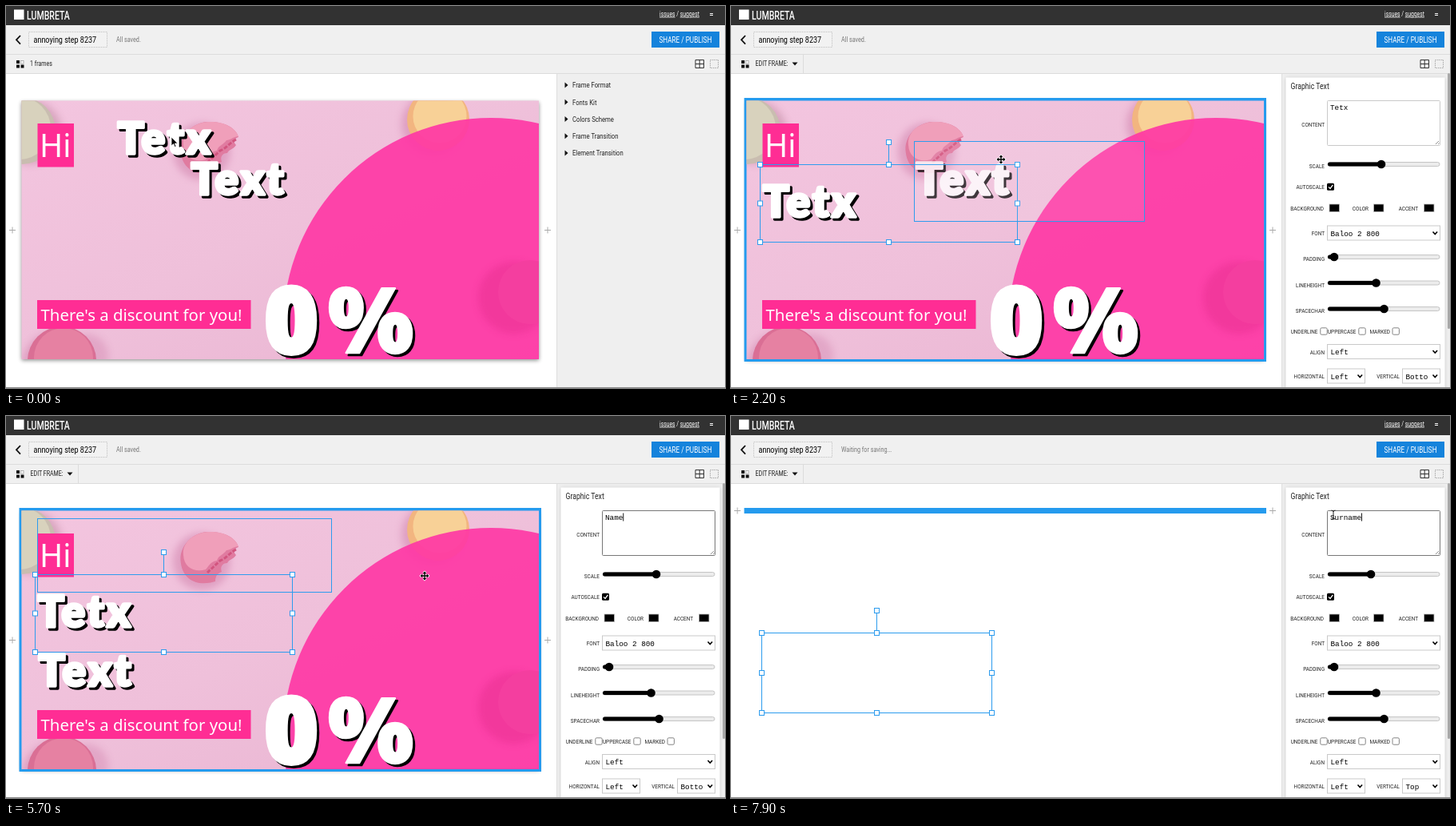
Write an HTML page that moves like this. It is 900 px wide and 478 px high and loops after 8 s.

```html
<!DOCTYPE html>
<html lang="en">
<head>
<meta charset="utf-8">
<title>Slide editor</title>
<style>
html, body { margin: 0; width: 100%; height: 100%; overflow: hidden; background: #fff; }
svg { display: block; width: 100vw; height: 100vh; }
text { white-space: pre; }
.ui { font-family: Roboto, "Liberation Sans", sans-serif; }
.mono { font: 9.3px "Liberation Mono", monospace; fill: #000; }
.sans { font-family: "Noto Sans", "Open Sans", sans-serif; font-weight: 500; fill: #fff; }
.chubby { font-family: Lato, "Open Sans", sans-serif; font-weight: 900; letter-spacing: 3px; stroke-linejoin: round; }
.figure { font-family: "Open Sans", "Noto Sans", sans-serif; font-weight: 800; stroke-linejoin: round; }
.line { fill: none; stroke: #2d9cee; stroke-width: 1; }
.handle { fill: #fff; stroke: #2d9cee; stroke-width: 1; }
.field { fill: #fff; stroke: #c9c9c9; stroke-width: 1; }
</style>
</head>
<body>
<svg id="stage" viewBox="0 0 900 478" preserveAspectRatio="none">
  <defs>
    <clipPath id="slideClip"><rect x="19.5" y="118.5" width="647.5" height="323.5"/></clipPath>
    <linearGradient id="paper" x1="0" y1="0" x2="1" y2="1">
      <stop offset="0" stop-color="#f3c5df"/><stop offset=".5" stop-color="#efc0da"/><stop offset="1" stop-color="#e9b3d1"/>
    </linearGradient>
    <filter id="soft" x="-30%" y="-30%" width="160%" height="160%"><feGaussianBlur stdDeviation="5"/></filter>
    <filter id="lift" x="-5%" y="-5%" width="110%" height="112%"><feGaussianBlur stdDeviation="2.5"/></filter>
  </defs>
  <rect width="900" height="478" fill="#fff"/>
  <g id="chrome"></g>
  <g id="canvas"></g>
  <g id="side"></g>
  <g id="overlay"></g>
  <g id="pointer"></g>
</svg>
<script>
const LOOP = 8000, STEP = 100;
const $ = id => document.getElementById(id);
const put = (id, markup) => $(id).insertAdjacentHTML('beforeend', markup);
const rect = (x, y, w, h, fill, more = '') =>
  `<rect x="${x}" y="${y}" width="${w}" height="${h}" fill="${fill}" ${more}/>`;
const ball = (x, y, r, fill, more = '') => `<circle cx="${x}" cy="${y}" r="${r}" fill="${fill}" ${more}/>`;
const path = (d, more) => `<path d="${d}" ${more}/>`;

// Interface lettering in a condensed cut
const label = (x, y, size, str, more = '', narrow = .82) =>
  `<text class="ui" transform="translate(${x} ${y}) scale(${narrow} 1)" font-size="${size}" fill="#222" ${more}>${str}</text>`;
const tag = (x, y, str) => label(x, y, 7.8, str, 'text-anchor="end"');
const mono = (x, y, str, id = '') => `<text class="mono" x="${x}" y="${y}" id="${id}">${str}</text>`;

// Header and toolbars
put('chrome',
  rect(0, 0, 900, 24, '#323232') +
  rect(10, 4.5, 12.5, 12.5, '#fff') +
  label(26, 16.5, 15.5, 'LUMBRETA', 'style="fill:#fff" font-weight="500"', .68) +
  label(818, 12.5, 8.3, '<tspan text-decoration="underline">issues</tspan> / <tspan text-decoration="underline">suggest</tspan>', 'style="fill:#fff"') +
  rect(881, 9, 4, 1, '#fff') + rect(881, 11, 4, 1, '#fff') +
  rect(0, 24, 900, 61, '#f0f0f0') +
  path('M0 60.5H900M0 84.5H900', 'stroke="#dcdcdc"') +
  path('M18 37L13 42.3L18 47.6', 'fill="none" stroke="#111" stroke-width="1.8"') +
  rect(28.5, 32.5, 98, 19, '#f2f2f2', 'stroke="#ccc" stroke-dasharray="2 1"') +
  label(34.5, 46, 11, 'annoying step 8237', 'style="fill:#000"') +
  label(138, 45, 8.8, 'All saved.', 'id="status" style="fill:#777"') +
  rect(808, 32, 85, 20, '#1583dc') +
  label(850.5, 46, 10, 'SHARE / PUBLISH', 'text-anchor="middle" style="fill:#fff"') +
  rect(13, 68, 4, 4, '#111') + rect(18.5, 68.5, 3.5, 3.5, '#fff', 'stroke="#999" stroke-width=".7"') +
  rect(13, 73.5, 4, 4, '#111') + rect(18.5, 73.5, 4, 4, '#111') +
  `<g id="barIdle">${label(30, 75, 8.6, '1 frames')}</g>` +
  `<g id="barEdit">${label(30.5, 75, 8.6, 'EDIT FRAME:')}${path('M76.5 70.5H83.5L80 74.5Z', 'fill="#111"')}
    ${path('M90.5 61V84', 'stroke="#dcdcdc"')}</g>` +
  path('M863 67.5H873.5V77.5H863ZM868.2 67.5V77.5M863 72.5H873.5', 'fill="none" stroke="#333"') +
  rect(881.5, 67.5, 10, 10, 'none', 'stroke="#aaa" stroke-dasharray="1.5 1"'));

// Slide
const sticker = (id, x, y, size, str, edge, face = 'chubby') => `<g id="${id}" class="${face}" font-size="${size}" stroke-width="${edge}">
  <text x="${x + 3}" y="${y + 3}" fill="#000" stroke="#000">${str}</text>
  <text x="${x}" y="${y}" fill="#fff" stroke="#fff">${str}</text></g>`;
const cookie = (x, y, r, base, top) =>
  ball(x - 7, y + 6, r, '#c8719f', 'opacity=".42" filter="url(#soft)"') +
  ball(x, y, r, base) + ball(x + 2, y - 4, r * .86, top, 'opacity=".8"');

put('canvas',
  rect(19.5, 120.5, 647.5, 323, '#000', 'id="shade" opacity=".45" filter="url(#lift)"') +
  rect(16.5, 115, 653.5, 330, '#259bee', 'id="border"') +
  `<g id="slide" clip-path="url(#slideClip)">` +
  rect(19, 118, 649, 325, 'url(#paper)') +
  ball(30, 158, 40, '#b77f96', 'opacity=".45" filter="url(#soft)"') +
  ball(20, 156, 42, '#c9bdb0') + ball(17, 153, 39, '#d8d2bd') +
  ball(245, 182, 36, '#c8719f', 'opacity=".42" filter="url(#soft)"') +
  path('M219 185C215 165 232 146 252 145C272 144 288 152 291 164C285 166 284 170 288 174C284 180 279 179 277 184C270 184 268 190 270 195C263 197 262 203 262 207C240 214 222 205 219 185Z', 'fill="#e07ba0"') +
  path('M222 174C220 158 236 146 253 145C272 144 287 152 291 163C283 164 281 168 276 168C272 174 266 174 264 181C256 182 254 188 250 192C236 196 223 190 222 174Z', 'fill="#f09fba"') +
  path('M288 167C279 172 276 178 268 181C262 187 258 190 252 196', 'fill="none" stroke="#d2557f" stroke-width="3" stroke-dasharray="5 2"') +
  cookie(541, 142, 39, '#f2b580', '#fbd99d') +
  ball(100, 438, 28, '#c8719f', 'opacity=".3" filter="url(#soft)"') +
  cookie(70, 444, 43, '#da6f95', '#ea86a6') +
  ball(607, 400, 260, '#ff36a5', 'opacity=".9"') +
  `<g opacity=".55">${ball(636, 365, 45, '#d9217f', 'opacity=".55" filter="url(#soft)"')}${ball(656, 358, 40, '#ee3c98')}</g>` +
  rect(39.5, 147, 45.5, 54.5, '#ff2d94') +
  '<text class="sans" x="42" y="188.5" font-size="39.5">Hi</text>' +
  rect(39, 368, 267.5, 36, '#ff2d94') +
  '<text class="sans" x="43.5" y="393.5" font-size="20.4">There\'s a discount for you!</text>' +
  sticker('tetx', 139.5, 185, 55, 'Tetx', 3.4) +
  sticker('text', 231.5, 236, 55, 'Text', 3.4) +
  sticker('zero', 324, 434, 113, '0', 6, 'figure') +
  sticker('percent', 403, 434, 113, '%', 2.5, 'figure') +
  '</g>' +
  '<g id="pluses" stroke="#aaa">' +
  path('M4 0H12M8 -4V4M674 0H682M678 -4V4', 'fill="none"') + '</g>');

// Side bar
const menu = ['Frame Format', 'Fonts Kit', 'Colors Scheme', 'Frame Transition', 'Element Transition']
  .map((str, i) => {
    const y = 99 + i * 21.25;
    return path(`M699.5 ${y - 3.5}L703.5 ${y}L699.5 ${y + 3.5}Z`, 'fill="#111"') + label(709, y + 3.3, 9.4, str);
  }).join('');
const slider = (name, y, x, id = '') => tag(743, y + 5, name) +
  rect(747, y - 2.5, 140, 5, '#ececec', 'rx="2.5" stroke="#b9b9b9" stroke-width=".8"') +
  `<g id="${id}">` + rect(747, y - 2.5, x - 747, 5, '#000', 'rx="2.5"') + ball(x, y, 5.3, '#000') + '</g>';
const select = (x, y, w, str, id) => rect(x, y, w, 18, '#fff', 'class="field"') + mono(x + 4, y + 12.5, str, id) +
  rect(x + w - 12, y + 2, 11, 14, '#fff') +
  path(`M${x + w - 9} ${y + 7.5}l2.8 3l2.8 -3`, 'fill="none" stroke="#000" stroke-width="1.6"');
const swatch = (name, x, end) => tag(end, 255.5, name) + rect(x, 248, 12.5, 9.5, '#000', 'stroke="#bbb" stroke-width=".8"');
const check = (name, end, x) => tag(end, 409.5, name) + rect(x, 402.8, 8.4, 8.4, '#fff', 'rx="1.5" stroke="#777" stroke-width=".9"');

put('side',
  rect(690, 85, 210, 393, '#efefef') + path('M689.5 85V478', 'stroke="#dedede"') +
  `<g id="menu">${menu}</g><g id="panel">` +
  rect(694.5, 90, 199, 400, '#000', 'opacity=".15" filter="url(#lift)"') +
  rect(694.5, 89.5, 199, 392, '#fff') + rect(897, 84, 3, 320, '#a9a9a9', 'rx="1.5"') +
  label(700.5, 104, 10.6, 'Graphic Text') +
  tag(743, 151, 'CONTENT') +
  rect(746.5, 118.5, 141, 56, '#fff', 'id="area" class="field" rx="1"') +
  rect(749.5, 121, 24, 11, '#b4d5fe', 'id="mark"') +
  mono(750, 130, '', 'content') + rect(0, 121.5, .9, 10, '#000', 'id="caret"') +
  path('M882 173l4 -4M885 173l1.5 -1.5', 'stroke="#777" stroke-width=".8"') +
  slider('SCALE', 198, 801, 'scaleLow') +
  `<g id="scaleHigh">${rect(747, 195.5, 66, 5, '#000', 'rx="2.5"')}${ball(814, 198, 5.3, '#000')}</g>` +
  tag(743, 228.5, 'AUTOSCALE') + rect(746, 221.8, 9, 9, '#000', 'rx="1.5"') +
  path('M748 226.4l2 2l3.4 -4.6', 'fill="none" stroke="#fff" stroke-width="1.3"') +
  swatch('BACKGROUND', 749, 742) + swatch('COLOR', 804.5, 798) + swatch('ACCENT', 867.5, 860) +
  tag(743, 287, 'FONT') + select(746.5, 275, 141, 'Baloo 2 800') +
  slider('PADDING', 314, 755) + slider('LINEHEIGHT', 346.5, 807.5) + slider('SPACECHAR', 379, 817.5) +
  check('UNDERLINE', 734.5, 737.8) + check('UPPERCASE', 782.5, 785.8) + check('MARKED', 825, 828) +
  tag(743, 435.5, 'ALIGN') + select(746.5, 423.5, 141, 'Left') +
  tag(743, 466, 'HORIZONTAL') + select(746.5, 454, 47, 'Left') +
  tag(837, 466, 'VERTICAL') + select(840.5, 454, 47, 'Botto', 'vertical') +
  '</g>' + rect(0, 477, 900, 1, '#8a8a8a'));

// Selection frames and hover outlines
const frame = (id, w, h) => {
  const spots = [[w / 2, -28]];
  for (const x of [0, w / 2, w]) for (const y of [0, h / 2, h])
    if (x !== w / 2 || y !== h / 2) spots.push([x, y]);
  return `<g id="${id}"><rect id="${id}Hover" class="line" style="fill:#fff;fill-opacity:.08" width="${w}" height="${h}"/>` +
    `<g id="${id}Pick">${path(`M0 0H${w}V${h}H0ZM${w / 2} 0V-28`, 'class="line"')}` +
    spots.map(([x, y]) => `<rect class="handle" x="${x - 3}" y="${y - 3}" width="6" height="6"/>`).join('') + '</g></g>';
};
put('overlay', '<rect id="hiHover" class="line" x="39.5" y="128.5" width="368" height="92"/>' +
  frame('boxA', 322, 97) + frame('boxB', 288, 100));

const cross = 'M-4.5 0H4.5M0 -4.5V4.5M-3 -1.5L-4.5 0L-3 1.5M3 -1.5L4.5 0L3 1.5M-1.5 -3L0 -4.5L1.5 -3M-1.5 3L0 4.5L1.5 3';
put('pointer',
  `<g id="arrow">${path('M0 0V11L2.6 8.6L4.4 12.5L6 11.8L4.3 8H8Z', 'fill="#000" stroke="#fff" stroke-width=".8"')}</g>` +
  `<g id="move">${path(cross, 'fill="none" stroke="#fff" stroke-width="3"')}${path(cross, 'fill="none" stroke="#000" stroke-width="1.3"')}</g>` +
  `<g id="ring">${ball(0, 0, 13, 'none', 'stroke="#222" stroke-width="1.2"')}</g>` +
  `<g id="beam">${path('M-2.5 -5Q0 -5 0 -3Q0 -5 2.5 -5M0 -3V4M-2.5 6Q0 6 0 4Q0 6 2.5 6', 'fill="none" stroke="#222"')}</g>`);

// Motion: time, x, y
const cursorPath = [[0, 207, 164], [300, 199, 163], [500, 195, 165], [1200, 87, 245], [1400, 87, 245], [1600, 96, 243],
  [1800, 110, 240], [2200, 338, 192], [2300, 337, 191], [3000, 141, 290], [3200, 146, 292], [3400, 147, 293],
  [3600, 120, 205], [3900, 118, 245], [4200, 130, 240], [4400, 400, 200], [4700, 755, 127], [5500, 756, 127],
  [5700, 524, 200], [6100, 165, 315], [6300, 150, 325], [6600, 150, 325], [7100, 754, 123]];
const pathA = [[500, 0, 0], [1200, -108, 81], [1400, -108, 81], [1600, -100, 79]];
const pathB = [[2300, 0, 0], [3000, -196, 99], [3200, -191, 101], [3400, -191, 102]];

function at(keys, t) {
  const i = keys.findIndex(k => k[0] > t);
  if (i === 0) return keys[0].slice(1);
  if (i < 0) return keys[keys.length - 1].slice(1);
  const [t0, x0, y0] = keys[i - 1], [t1, x1, y1] = keys[i];
  const p = (t - t0) / (t1 - t0), e = p * p * (3 - 2 * p);
  return [x0 + (x1 - x0) * e, y0 + (y1 - y0) * e];
}
const show = (id, on) => $(id).style.display = on ? '' : 'none';
const place = (id, x, y) => $(id).setAttribute('transform', `translate(${x} ${y})`);
const within = (t, ...spans) => spans.some(([a, b]) => t >= a && t < b);
const write = (id, str) => [...$(id).children].forEach(n => n.textContent = str);

function hover(box, text, on) {
  show(box + 'Hover', on);
  $(text).style.opacity = on ? .8 : 1;
}

function contentAt(t) {
  if (t < 2300) return 'Tetx';
  if (t < 4100) return 'Text';
  if (t < 5000) return 'Tetx';
  if (t < 6200) return 'Name'.slice(0, (t - 4900) / 100);
  if (t < 7200) return 'Text';
  return 'Surname'.slice(0, (t - 7100) / 100);
}

function draw(t) {
  const editing = t >= 300, blank = t >= 7800;
  const dragA = within(t, [500, 1600]), dragB = within(t, [2300, 3400]);
  const pickA = within(t, [300, 2300], [4100, 6200]);
  const typing = within(t, [4800, 5900], [7100, LOOP]);

  show('barIdle', !editing); show('barEdit', editing);
  show('menu', !editing); show('panel', editing);
  show('border', editing); show('slide', !blank); show('shade', !blank);
  $('border').setAttribute('height', blank ? 7 : 330);
  place('pluses', 0, blank ? 118.5 : 280.5);
  $('status').textContent = blank || within(t, [5900, 6400]) ? 'Waiting for saving...' : 'All saved.';

  const [ax, ay] = at(pathA, t), [bx, by] = at(pathB, t);
  place('tetx', ax, ay); place('text', bx, by);
  place('boxA', 136.5 + ax, 119.5 + ay); place('boxB', 229.5 + bx, 169.5 + by);
  write('tetx', t < 5900 ? 'Tetx' : 'Name');
  show('boxAPick', pickA);
  show('boxBPick', editing && !pickA);
  $('boxAPick').style.opacity = $('boxAHover').style.strokeOpacity = dragA ? .5 : 1;
  $('boxBPick').style.opacity = $('boxBHover').style.strokeOpacity = dragB ? .5 : 1;
  hover('boxA', 'tetx', within(t, [300, 1800], [3800, 4300]));
  hover('boxB', 'text', within(t, [2000, 3500], [6000, 6700]));
  show('hiHover', within(t, [3500, 3800], [4300, 5900]));

  const str = contentAt(t);
  $('content').textContent = str;
  $('vertical').textContent = pickA ? 'Botto' : 'Top';
  show('scaleHigh', pickA); show('scaleLow', !pickA);
  show('mark', within(t, [4800, 5000], [7100, 7200]));
  show('caret', within(t, [5000, 5900], [7200, LOOP]));
  $('caret').setAttribute('x', 750 + str.length * 5.58);
  $('area').style.stroke = typing ? '#777' : '#c9c9c9';

  const [cx, cy] = at(cursorPath, t);
  const beam = cx > 746, cross = !beam && editing && cx < 690;
  place('pointer', cx, cy);
  show('beam', beam); show('move', cross); show('arrow', !beam && !cross);
  show('ring', dragA || dragB);
}

const start = performance.now();
function tick() {
  const t = (performance.now() - start) % LOOP;
  draw(Math.floor(t / STEP) * STEP);
  requestAnimationFrame(tick);
}
tick();
</script>
</body>
</html>
```
